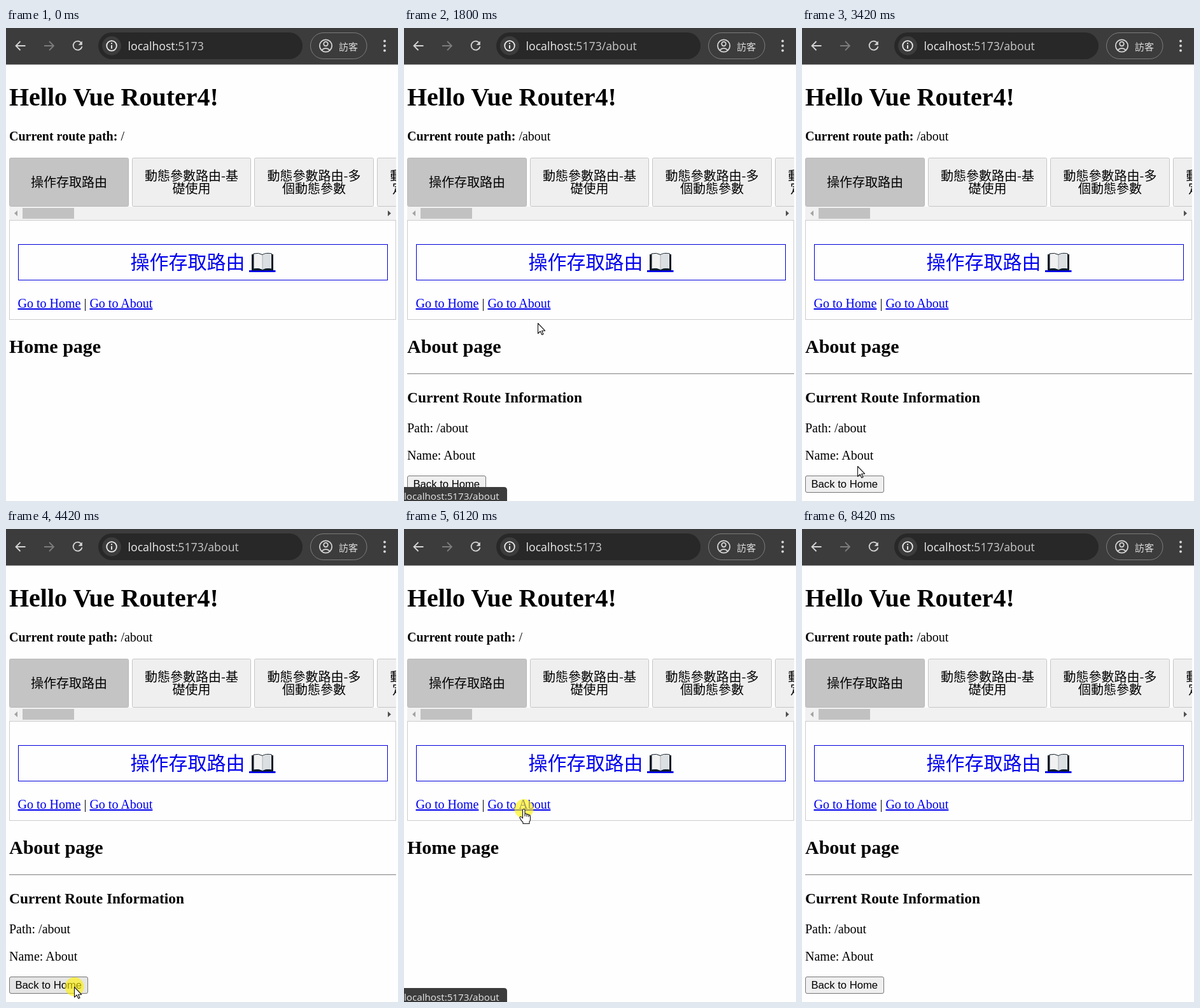
Recreate the animation shown at these times as an HTML page. Size 616 by 744 pixels, loop 8.55 s.

```html
<!DOCTYPE html>
<html lang="zh-Hant">
<head>
<meta charset="utf-8">
<title>Vue Router demo</title>
<style>
  html, body { margin: 0; width: 100%; height: 100%; overflow: hidden; background: #fefefe; }
  svg { display: block; }
  text { white-space: pre; }
  .serif { font: 20px "Liberation Serif", "Times New Roman", serif; }
  .bold { font-weight: 700; }
  .ui { font-family: "Open Sans", "Noto Sans", sans-serif; }
  .cjk { font: 20px "Noto Sans CJK TC", "Noto Sans CJK JP", "Noto Sans CJK", sans-serif; }
  .mid { text-anchor: middle; }
  .link { fill: #00e; text-decoration: underline; }
  .line { fill: none; stroke: #d5d5d5; stroke-width: 1.8; }
  .tab { fill: #efefef; stroke: #c6c6c6; }
  .cursor { fill: #fff; stroke: #111; stroke-width: 1.1; stroke-linejoin: round; }
</style>
</head>
<body>
<svg width="616" height="744" viewBox="0 0 616 744">
  <clipPath id="strip"><rect x="5" y="200" width="608" height="82"/></clipPath>

  <!-- browser bar -->
  <rect width="616" height="57.5" fill="#3c3c3c"/>
  <path class="line" d="M30.500 28H16M22.500 21L15.500 28L22.500 35"/>
  <path class="line" style="stroke:#7c7c7c" d="M60 28H74.500M68 21L75 28L68 35"/>
  <path class="line" d="M118.300 23.500A7 7 0 1 0 119.500 29"/>
  <path d="M119.800 20.500V26.800H113.500Z" fill="#d5d5d5"/>
  <rect x="145" y="7" width="321" height="42" rx="21" fill="#282828"/>
  <circle cx="166" cy="28" r="15" fill="#3c3c3c"/>
  <circle class="line" cx="166" cy="28" r="7.800" style="stroke:#eee"/>
  <path d="M166 27V32.500M166 23.300V25.300" stroke="#eee" stroke-width="1.900"/>
  <text class="ui" x="191.500" y="35" font-size="17.700" fill="#ececec">localhost<tspan id="url" fill="#c9c9c9">:5173</tspan></text>
  <rect x="478.500" y="7.500" width="88.500" height="41" rx="20.500" fill="none" stroke="#7d7d7d"/>
  <g class="line">
    <circle cx="502.500" cy="28" r="9.600"/>
    <circle cx="502.500" cy="25" r="3.300"/>
    <path d="M496 34.800Q502.500 29 509 34.800"/>
  </g>
  <text class="cjk" x="523" y="34.500" style="font-size:15px" fill="#ddd">訪客</text>
  <g fill="#d5d5d5">
    <circle cx="595" cy="20.500" r="2"/><circle cx="595" cy="28" r="2"/><circle cx="595" cy="35.500" r="2"/>
  </g>

  <!-- heading -->
  <text class="serif bold" x="5" y="122" style="font-size:40px">Hello Vue Router4!</text>
  <text class="serif" x="5" y="177"><tspan class="bold">Current route path:</tspan> <tspan id="path">/</tspan></text>

  <!-- tabs -->
  <g clip-path="url(#strip)">
    <g class="tab">
      <rect x="5.500" y="204.500" width="187" height="76" rx="2" fill="#c4c4c4" stroke="#b8b8b8"/>
      <rect x="198.500" y="204.500" width="186" height="76" rx="2"/>
      <rect x="390.500" y="204.500" width="187" height="76" rx="2"/>
      <rect x="583.500" y="204.500" width="187" height="76" rx="2"/>
    </g>
    <rect x="6" y="205" width="186" height="75" fill="#c4c4c4"/>
    <g class="cjk mid">
      <text x="99" y="250">操作存取路由</text>
      <text x="291.500" y="240">動態參數路由-基</text>
      <text x="291.500" y="260">礎使用</text>
      <text x="484" y="240">動態參數路由-多</text>
      <text x="484" y="260">個動態參數</text>
      <text x="677" y="240">動態參數路由-自</text>
      <text x="677" y="260">定義正則表達式</text>
    </g>
  </g>
  <rect x="5" y="281" width="608" height="21" fill="#f1f1f1"/>
  <rect x="26" y="283" width="81" height="17" fill="#c1c1c1"/>
  <path d="M18 287V296L13 291.500Z" fill="#a3a3a3"/>
  <path d="M600 287V296L605 291.500Z" fill="#505050"/>

  <!-- panel -->
  <rect x="5.500" y="302.500" width="607" height="156" fill="none" stroke="#ccc"/>
  <rect x="19.500" y="340.500" width="580" height="56" fill="none" stroke="#00d"/>
  <text class="cjk bold" x="195.500" y="378.500" style="font-size:30px" fill="#00e">操作存取路由</text>
  <path d="M382 382.500H423.500" stroke="#00e" stroke-width="3"/>
  <path d="M386 356H420V381.500H386Z" fill="#0b1a26"/>
  <path d="M389 355Q397 353 403 356.500Q409 353 417.500 355V379Q409 377 403 380.500Q397 377 389 379Z" fill="#f1f1f1" stroke="#0b1a26"/>
  <path d="M403 357V380Q409 376.500 416.500 378.300V355.500Q409 354 403 357Z" fill="#dcdfe2"/>
  <path d="M403 357V380" stroke="#a9b0b5"/>
  <text class="serif" x="18.500" y="440"><tspan class="link">Go to Home</tspan> | <tspan class="link">Go to About</tspan></text>

  <!-- routed view -->
  <text id="title" class="serif bold" x="5" y="511" style="font-size:30px">Home page</text>
  <g id="about">
    <path d="M5 543.500H613" stroke="#9a9a9a"/>
    <path d="M5 544.500H613" stroke="#d8d8d8"/>
    <text class="serif bold" x="5" y="589" style="font-size:23.400px">Current Route Information</text>
    <text class="serif" x="5" y="636">Path: /about</text>
    <text class="serif" x="5" y="679">Name: About</text>
    <rect id="btn" x="5.500" y="704.500" width="123" height="26" rx="2.500" stroke="#767676"/>
    <text x="14.500" y="723" font-size="16.670" font-family="Liberation Sans, Arial, sans-serif">Back to Home</text>
  </g>

  <g id="status">
    <path d="M0 722H157Q162 722 162 727V744H0Z" fill="#3c3c3c"/>
    <text class="ui" x="0" y="742" font-size="15.200" fill="#e6e6e6">localhost:5173/about</text>
  </g>

  <g id="pointer">
    <circle id="press" cx=".5" r="15" fill="#fff000" fill-opacity=".62"/>
    <path id="A" class="cursor" d="M.5 .5V16.500L4.200 13L6.800 18.500L9 17.500L6.600 12.200H11.600Z"/>
    <path id="H" class="cursor" d="M-1.500 2Q-1.500 .5 0 .5T2 2V8Q4 7 5 9Q7 8 8 10Q10.500 9.500 10.500 12V17Q10.500 19 9 20.500V23.500H-1V21.500Q-4 18.500 -6 14.500Q-6.500 12.500 -4.500 12.500Q-3.500 12.500 -1.500 15ZM2 8V12M5 9V12.500M8 10V13"/>
    <path id="I" d="M-3 -7.500H-1Q.5 -7.500 .5 -6Q.5 -7.500 2 -7.500H4M.5 -6.500V6.500M-3 7.500H-1Q.5 7.500 .5 6Q.5 7.500 2 7.500H4" fill="none" stroke="#111" stroke-width="1.100"/>
  </g>
</svg>
<script>
const LOOP = 8550, STEP = 67;
const $ = id => document.getElementById(id);

// time, hotspot x, y, cursor shape (A arrow, H hand, I beam, - hidden)
const moves = [
  [0, 453, 730, '-'], [190, 453, 730, 'A'], [500, 335, 600, 'A'], [740, 228, 478, 'A'],
  [870, 194, 430, 'H'], [1010, 183, 437, 'H'],
  [1543, 183, 437, 'H'], [1680, 193, 446, 'H'], [1750, 210, 464, 'A'], [1950, 188, 540, 'A'],
  [2150, 118, 602, 'A'], [2280, 93, 624, 'I'],
  [2473, 93, 624, 'I'], [2540, 85, 638, 'I'], [2800, 72, 676, 'I'], [3020, 75, 668, 'I'],
  [3223, 75, 668, 'A'], [3560, 106, 720, 'A'], [4090, 107, 720, 'A'],
  [4823, 107, 720, 'A'], [5180, 222, 535, 'A'],
  [5443, 222, 535, 'A'], [5510, 222, 533, 'A'], [5840, 188, 440, 'H'],
  [6513, 188, 440, 'H'], [6580, 188, 435, 'H'], [6650, 184, 460, 'A'], [6850, 136, 572, 'A'],
  [6990, 114, 636, 'A'], [7260, 104, 692, 'A'], [7400, 118, 708, 'A'],
  [7460, 150, 686, 'A'], [7600, 285, 698, 'A'], [7740, 482, 728, 'A'], [7800, 482, 744, '-']
];
const fades = [
  [0, 0], [940, 0], [1010, .45], [1080, 1], [1990, 1], [2200, 0],
  [5913, 0], [5980, .5], [6050, 1], [6920, 1], [6990, .62], [7130, 0]
];
const routes = [[1140, 4550], [6180, LOOP]];
const clicks = [[1080, 1210], [4420, 4550], [6110, 6250]];

const within = (spans, t) => spans.some(([a, b]) => t >= a && t < b);

function sample(rows, t) {
  const i = rows.findLastIndex(r => r[0] <= t);
  const a = rows[i], b = rows[i + 1] || a;
  const passed = Math.floor((t - a[0]) / STEP) * STEP;
  const k = b === a ? 0 : passed / (b[0] - a[0]);
  return a.map((v, n) => typeof v === 'number' ? v + (b[n] - v) * k : v);
}

function draw(t) {
  const about = within(routes, t);
  const [, x, y, shape] = sample(moves, t);
  const hover = shape !== '-' && x >= 5 && x <= 129 && y >= 704 && y <= 731;

  $('url').textContent = about ? ':5173/about' : ':5173';
  $('path').textContent = about ? '/about' : '/';
  $('title').textContent = about ? 'About page' : 'Home page';
  $('about').style.display = about ? '' : 'none';
  $('btn').setAttribute('fill', hover ? '#e5e5e5' : '#efefef');
  $('status').style.opacity = sample(fades, t)[1];

  $('pointer').setAttribute('transform', `translate(${Math.round(x)} ${Math.round(y)})`);
  $('press').style.display = within(clicks, t) ? '' : 'none';
  for (const id of 'AHI') $(id).style.display = id === shape ? '' : 'none';
}

const start = performance.now();
function tick() {
  draw((performance.now() - start) % LOOP);
  requestAnimationFrame(tick);
}
tick();
</script>
</body>
</html>
```
